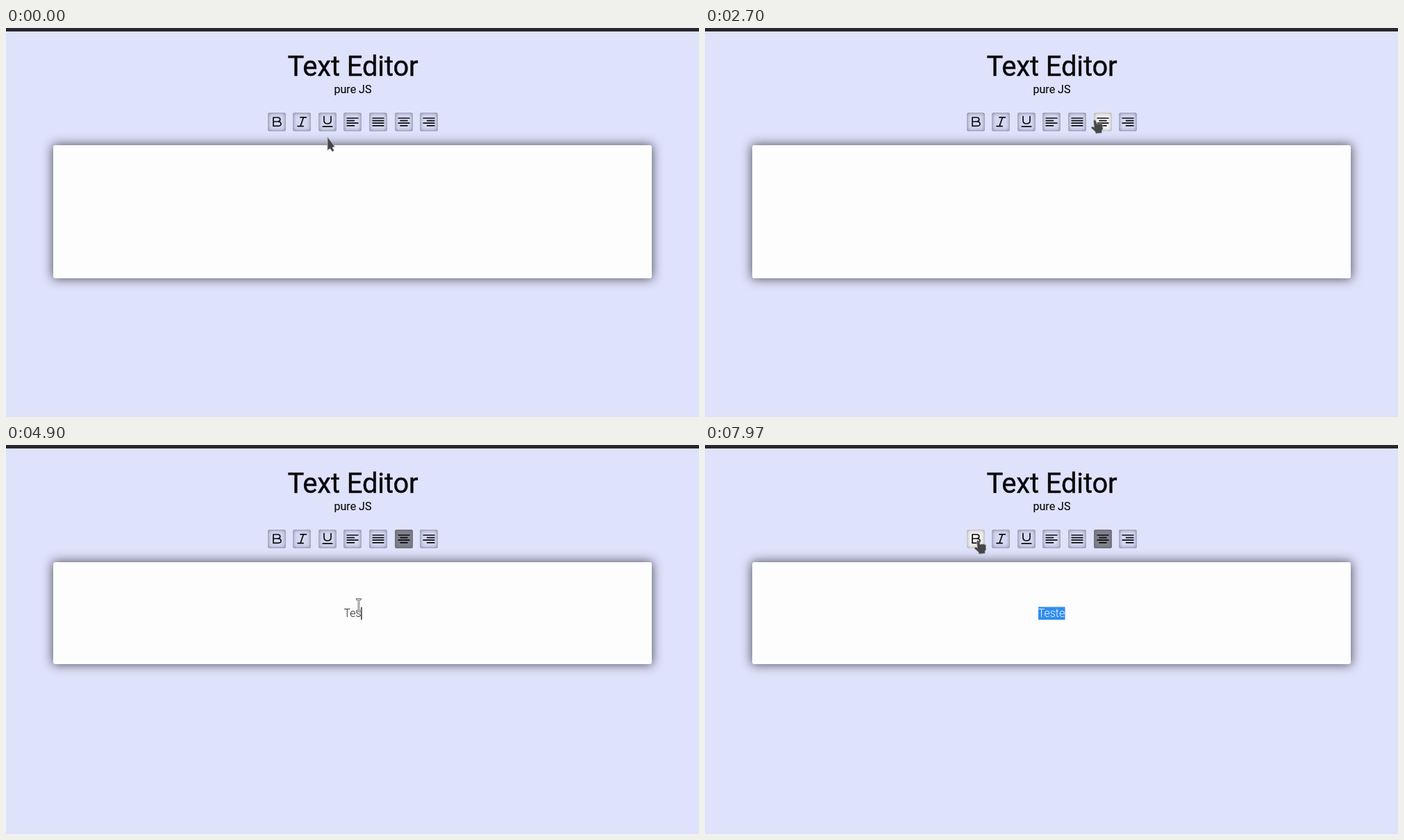
These frames come from a looping animation (998 by 561 pixels, 8 s). An HTML page:

```html
<!DOCTYPE html>
<html lang="en">
<head>
<meta charset="utf-8">
<title>Text Editor</title>
<style>
  html, body { margin: 0; width: 100%; height: 100%; overflow: hidden; background: #dfe2fb; }
  #stage { position: relative; width: 998px; height: 561px; overflow: hidden; font-family: Roboto, sans-serif; }
  #stage > * { position: absolute; }
  #bar { left: 0; top: 0; width: 998px; height: 5px; background: #29262d; }
  #paper {
    left: 68px; top: 169px; width: 862px; background: #fdfdfd; border-radius: 3px;
    box-shadow: 0 0 15px 1px rgba(15, 15, 25, .68);
  }
  .button {
    top: 122px; width: 26px; height: 27px; border-radius: 3px; background: #d5d8f3;
    box-shadow: inset 0 0 5px 1px #85889b;
  }
  .button.hover { background: #f3f3f4; box-shadow: inset 0 0 5px 1px #aaaaad; }
  .button.active { background: #80828c; box-shadow: inset 0 0 4px 1px #666872; }
  .button svg { display: block; fill: none; stroke: #0b0b10; stroke-width: 1.7; stroke-linecap: round; stroke-linejoin: round; }
  #layer { left: 0; top: 0; }
  #word { font-size: 16px; font-weight: 300; }
</style>
</head>
<body>
<div id="stage">
  <div id="bar"></div>
  <div id="paper"></div>
  <svg id="layer" width="998" height="561">
    <g text-anchor="middle" fill="#08080c">
      <text x="499.5" y="68.5" font-size="40" letter-spacing="-.15" stroke="#08080c" stroke-width=".4">Text Editor</text>
      <text x="499.5" y="94" font-size="16" stroke="#08080c" stroke-width=".15">pure JS</text>
    </g>
    <rect id="selection" x="480" y="233.5" width="38.5" height="18.5" fill="#308df0"/>
    <text id="word" x="499" y="248" text-anchor="middle"></text>
    <rect id="caret" y="234" width="1.3" height="18" fill="#111"/>
  </svg>
  <svg id="pointer" width="40" height="40" style="left:0;top:0;overflow:visible">
    <path id="arrow" d="M0 -1V18.5L3.6 15.8L7 20.5L9.5 18.8L7 14.2L10.5 13.2Z" fill="#444347" stroke="#b9bacb" stroke-width=".9"/>
    <path id="hand" d="M-1.5 1Q0 -1.8 1.9 .7L3.6 5.6Q5.3 3.9 6.6 5.3Q8.3 4 9.4 5.2Q11.5 4.8 11.8 7L12 12.8L10.4 15.5V18.5L1.8 19.2L.8 16.2L-4.8 11.3Q-5.2 9 -2.7 9.2L-.5 10.2Z" fill="#464648" stroke="#b9bac4" stroke-width=".8"/>
    <g id="beam" fill="none" stroke-linecap="square">
      <path d="M-2.5 -8.5H2.5M0 -8.5V8.5M-2.5 8.5H2.5" stroke="#77777a" stroke-width="2.8"/>
      <path d="M-2.5 -8.5H2.5M0 -8.5V8.5M-2.5 8.5H2.5" stroke="#e2e2dc" stroke-width="1"/>
    </g>
  </svg>
</div>
<script>
const LOOP = 8000, CENTER = 5;
const CLICK_PAPER = 470, CLICK_CENTER = 2900, REFOCUS = 3480, SELECT = 6700;
const BLINK = 530;
const $ = id => document.getElementById(id);

const lines = (...spans) => spans.map(([from, to], i) => `M${from} ${8 + i * 3.6}H${to}`).join('');
const full = [5.2, 20.8];
const icons = [
  'M8 7H14.2Q17.8 7.2 17.8 10T14.2 13H8M14.2 13Q19 13 19 16.2T14.6 19.4H8V7',
  'M11 6.8H19.4M7 19.6H15.2M15.5 6.8L11 19.6',
  'M8 5.5V11.2Q8 16 13 16T18 11.2V5.5M6.3 20.2H19.7',
  lines(full, [5.2, 15.5], full, [5.2, 15.5]),
  lines(full, full, full, full),
  lines(full, [8, 18], full, [8, 18]),
  lines(full, [10.5, 20.8], full, [10.5, 20.8])
];
const buttons = icons.map((d, i) => {
  const el = document.createElement('div');
  el.className = 'button';
  el.left = 376.5 + i * 36.6;
  el.style.left = el.left + 'px';
  el.innerHTML = `<svg width="26" height="27"><path d="${d}"/></svg>`;
  $('stage').insertBefore(el, $('layer'));
  return el;
});

// time, x, y
const route = [
  [0, 463, 158], [300, 480, 48], [780, 508, 230], [1500, 508, 230],
  [1860, 508, 134], [1930, 512, 134], [2300, 536, 133], [2700, 561, 133],
  [2880, 568, 134], [3130, 568, 134], [3450, 508, 231], [7360, 508, 231],
  [7900, 392, 138], [LOOP, 393, 138]
];
// time, text, caret x
const typing = [[0, '', 148], [CLICK_CENTER, '', 499], [3780, 'T', 503], [4250, 'Te', 507.5],
  [4600, 'Tes', 511.5], [4950, 'Test', 514.5], [5300, 'Teste', 518]];

const latest = (steps, t) => steps.filter(s => s[0] <= t).pop();

function position(t) {
  const i = route.findIndex(p => p[0] > t);
  const [t0, x0, y0] = route[i - 1], [t1, x1, y1] = route[i];
  const u = (t - t0) / (t1 - t0), k = u * u * (3 - 2 * u);
  return [x0 + (x1 - x0) * k, y0 + (y1 - y0) * k];
}

function caretVisible(t, typedAt) {
  if (t < CLICK_PAPER || t >= SELECT) return false;
  if (t > 2060 && t < REFOCUS) return false;
  const since = t < REFOCUS ? CLICK_PAPER : Math.max(REFOCUS, typedAt);
  return Math.floor((t - since) / BLINK) % 2 === 0;
}

const show = (id, on) => $(id).style.display = on ? '' : 'none';

function draw(t) {
  const centered = t >= CLICK_CENTER, selected = t >= SELECT;
  const height = centered ? 147 : 192;
  $('paper').style.height = height + 'px';

  const [x, y] = position(t);
  const over = buttons.findIndex(b => x >= b.left && x <= b.left + 26 && y >= 122 && y <= 149);
  buttons.forEach((b, i) => {
    b.classList.toggle('hover', i === over);
    b.classList.toggle('active', i === CENTER && centered);
  });

  const inPaper = y > 169 && y < 169 + height;
  $('pointer').style.transform = `translate(${x}px, ${y}px)`;
  show('hand', over >= 0);
  show('beam', inPaper);
  show('arrow', over < 0 && !inPaper);

  const [typedAt, text, caretX] = latest(typing, t);
  $('word').textContent = text;
  $('word').setAttribute('fill', selected ? '#eef5ff' : '#26262a');
  $('caret').setAttribute('x', caretX - .2);
  show('caret', caretVisible(t, typedAt));
  show('selection', selected);
}

const start = performance.now();
function tick() {
  draw((performance.now() - start) % LOOP);
  requestAnimationFrame(tick);
}
tick();
</script>
</body>
</html>
```
